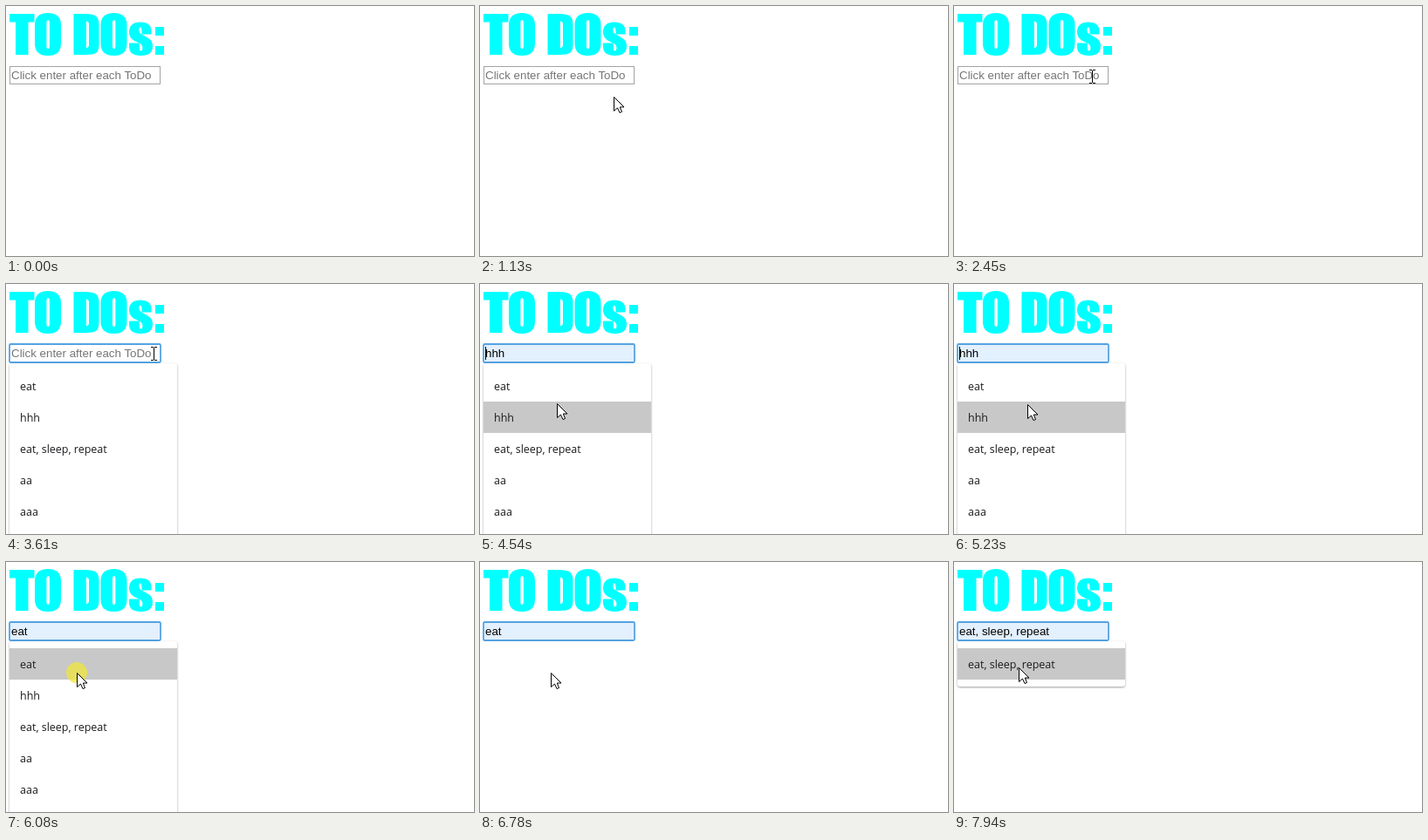
These frames come from a looping animation (536 by 287 pixels, 8 s). An HTML page:

```html
<!DOCTYPE html>
<html lang="en">
<head>
<meta charset="utf-8">
<title>To dos</title>
<style>
  html, body { margin: 0; width: 100%; height: 100%; overflow: hidden; background: #fff; }
  svg { display: block; }
  .field { font: 13.333px "Liberation Sans", Arial, sans-serif; }
  .item { font: 12.5px "Open Sans", "Noto Sans", sans-serif; fill: #1c1d20; }
  #panel { filter: drop-shadow(0 1px 1.2px rgba(0, 0, 0, .38)); }
</style>
</head>
<body>
<svg width="536" height="287" viewBox="0 0 536 287">
  <g role="img" aria-label="TO DOs:" fill="#0ff" fill-rule="evenodd">
    <path d="M4 9H32.5V18.5H25.5V56H11V18.5H4Z"/>
    <path id="letterO" d="M33 22Q33 8 48 8T63 22V43Q63 57 48 57T33 43Z
      M46.4 18.5V46.5Q46.4 49 48.1 49T49.9 46.5V18.5Q49.9 16 48.2 16T46.4 18.5Z"/>
    <path d="M77.5 9H90Q100 9 103 11.5Q106.5 14.5 106.5 22V44Q106.5 51 103.5 53.5Q100.5 56 91 56H77.5Z
      M91.8 17.5V48Q95 48 95 44.5V21Q95 17.5 91.8 17.5Z"/>
    <use href="#letterO" x="75.5"/>
    <path d="M166.5 32.5H155.5V29Q155.5 24.6 153.8 24.6Q152.3 24.6 152.3 27.5Q152.3 30.5 154.5 32
      L162.5 36.6Q168 40 168 46Q168 57 154.6 57Q141 57 141 46.5V42.6H152.8V47.5Q152.8 51.4 154.6 51.4
      Q156.4 51.4 156.4 48Q156.4 44.6 153 42.8L147 40Q141 36.5 141 30Q141 18.5 154 18.5Q166.5 18.5 166.5 29Z"/>
    <path d="M171 24H181V34H171ZM171 46H181V56H171Z"/>
  </g>

  <rect id="box" x="4.5" y="69.5" width="172" height="20" stroke="#a3a3a3"/>
  <rect id="ring" x="4" y="69" width="173" height="21" rx="1.5" fill="none" stroke="#55a3e3" stroke-width="1.8"/>
  <text id="value" class="field" x="6" y="84"></text>
  <rect id="caret" y="72" width="1" height="15"/>

  <g id="menu">
    <rect id="panel" x="4" y="91" width="192" rx="3" fill="#fff"/>
    <rect id="highlight" x="4" width="192" height="36" fill="#c8c8c8"/>
    <g id="items"></g>
  </g>

  <circle id="click" r="12" fill="#f0e63c" fill-opacity=".75"/>
  <path id="arrow" d="M.5 .5V16.5L4.5 13L7 18.5L9.5 17.5L7.3 12H12Z" fill="#fff" stroke="#000"/>
  <path id="beam" d="M-3 -7.5H0M1 -7.5H4M.5 -7V7M-3 7.5H0M1 7.5H4" fill="none" stroke="#000"/>
</svg>

<script>
const LOOP = 8000;
const ROW_TOP = 99, ROW_HEIGHT = 36, FIELD_BOTTOM = 91;
const FOCUS = 3060, MENU_OPEN = 3150, PRESS = 6080, CHOOSE = 6230, SUGGEST = 7010;
const PLACEHOLDER = 'Click enter after each ToDo';
const ALL = ['eat', 'hhh', 'eat, sleep, repeat', 'aa', 'aaa'];
const MATCHES = ['eat, sleep, repeat'];
const BLINKS = [FOCUS, 3610, 4160, 4700, 5230, 5770, CHOOSE, 6780];

// Pointer moves: start, end, steps, first point, last point
const MOVES = [
  [200, 280, 2, 334, 211, 258, 162],
  [580, 810, 4, 238, 150, 154, 110],
  [1130, 1740, 9, 153, 104, 148, 81],
  [2290, 2680, 6, 151, 81, 169, 80],
  [4160, 4310, 3, 148, 94, 88, 133],
  [4540, 4930, 6, 88, 137, 87, 178],
  [5160, 5160, 1, 86, 160, 86, 160],
  [5230, 5540, 5, 84, 138, 81, 127],
  [7790, 7940, 3, 79, 125, 74, 121]
];

const $ = id => document.getElementById(id);
const show = (id, on) => $(id).setAttribute('visibility', on ? 'visible' : 'hidden');
const place = (id, p) => $(id).setAttribute('transform', `translate(${p.x} ${p.y})`);

function pointerAt(t) {
  const move = MOVES.filter(m => m[0] <= t).pop();
  if (!move) return null;
  const [start, end, steps, x0, y0, x1, y1] = move;
  const gaps = steps - 1;
  const step = gaps ? Math.min(gaps, Math.floor((t - start) / (end - start) * gaps + 0.1)) : 0;
  const k = gaps ? step / gaps : 0;
  return { x: Math.round(x0 + (x1 - x0) * k), y: Math.round(y0 + (y1 - y0) * k) };
}

function menuAt(t) {
  if (t >= SUGGEST) return MATCHES;
  return t >= MENU_OPEN && t < CHOOSE ? ALL : [];
}

let shownItems = null;
function fillMenu(items) {
  if (items.join() === shownItems) return;
  shownItems = items.join();
  $('panel').setAttribute('height', items.length * ROW_HEIGHT + (items === ALL ? 60 : 16));
  $('items').innerHTML = items.map((label, i) =>
    `<text class="item" x="16" y="${ROW_TOP + 23 + i * ROW_HEIGHT}">${label}</text>`).join('');
}

function render(t) {
  const pointer = pointerAt(t);
  const items = menuAt(t);
  const row = pointer ? Math.floor((pointer.y - ROW_TOP) / ROW_HEIGHT) : -1;
  const preview = items[row];
  const chosen = t >= CHOOSE;
  const value = preview || (chosen ? 'eat' : '');
  const focused = t >= FOCUS;

  show('ring', focused);
  $('box').setAttribute('stroke', focused ? 'none' : '#a3a3a3');
  $('box').setAttribute('fill', value ? '#e3f0fd' : '#fff');
  $('value').textContent = value || PLACEHOLDER;
  $('value').setAttribute('fill', value ? '#000' : '#757575');
  $('caret').setAttribute('x', chosen ? 25 : 6);
  show('caret', BLINKS.filter(b => b <= t).length % 2);

  fillMenu(items);
  show('menu', items.length);
  show('highlight', preview);
  $('highlight').setAttribute('y', ROW_TOP + Math.max(row, 0) * ROW_HEIGHT);

  const overField = pointer && pointer.y < FIELD_BOTTOM;
  const pressed = (t >= FOCUS && t < MENU_OPEN) || (t >= PRESS && t < CHOOSE);
  show('arrow', pointer && !overField);
  show('beam', overField);
  show('click', pressed);
  if (pointer) ['arrow', 'beam', 'click'].forEach(id => place(id, pointer));
}

const began = performance.now();
function tick() {
  render((performance.now() - began) % LOOP);
  requestAnimationFrame(tick);
}
tick();
</script>
</body>
</html>
```
